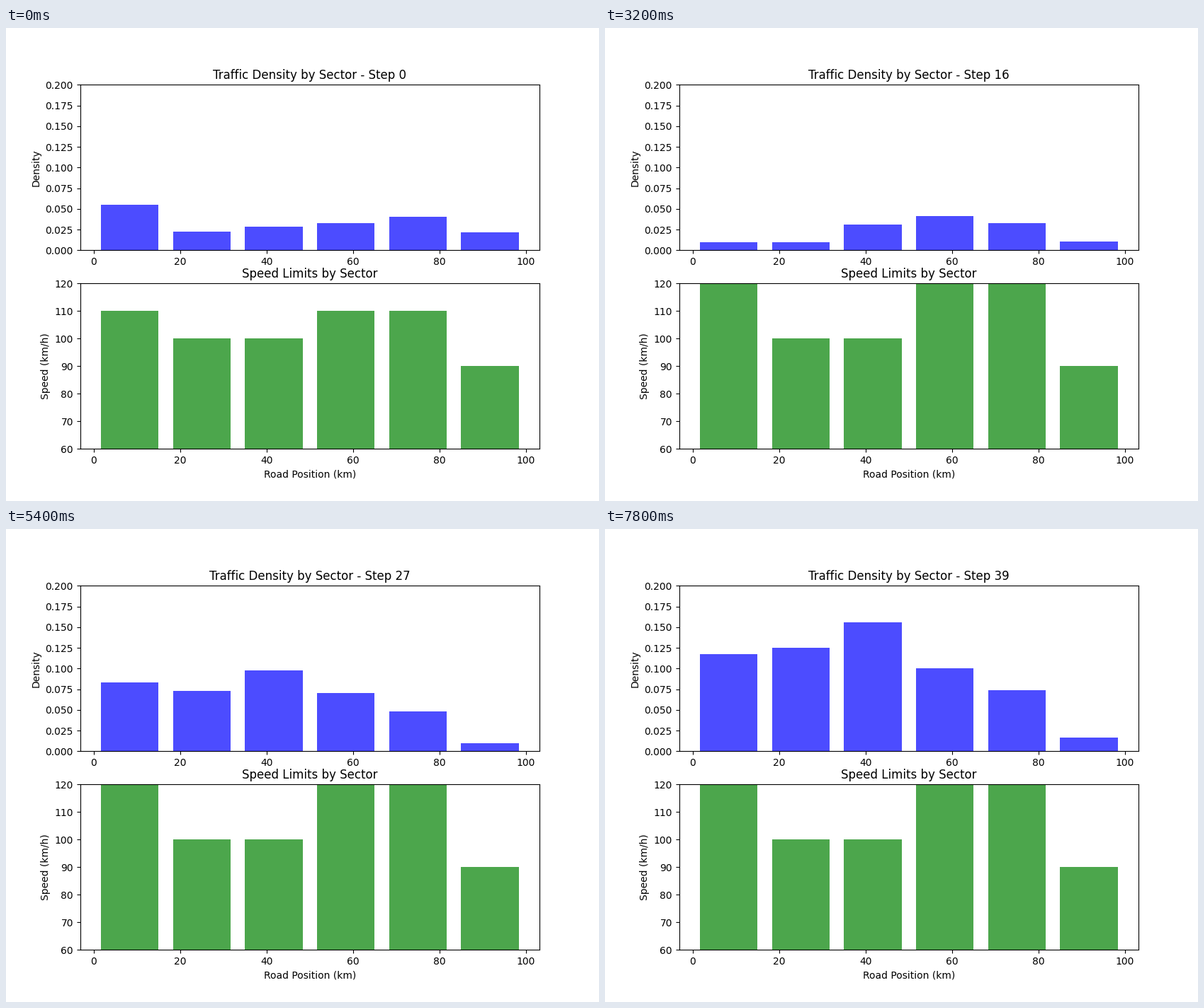
A matplotlib script that plays this animation: 837x669 px, repeating every 8000 ms.

```python
import numpy as np
import matplotlib.pyplot as plt
from matplotlib.animation import FuncAnimation

STEPS = 40
SECTORS = 6
ROAD = 100

# Sector densities at key steps; congestion waves roll down the road.
KEYS = {
    0: [.0550, .0222, .0287, .0330, .0402, .0215],
    6: [.0575, .0422, .0565, .0474, .0235, .0440],
    10: [.0592, .0557, .0750, .0572, .0265, .0592],
    16: [.0100, .0100, .0315, .0415, .0330, .0106],
    18: [.0400, .0310, .0400, .0405, .0305, .0100],
    22: [.1080, .0830, .0660, .0390, .0250, .0130],
    24: [.1150, .0950, .0850, .0550, .0340, .0115],
    27: [.0836, .0730, .0980, .0702, .0480, .0100],
    30: [.0900, .0820, .0970, .0740, .0520, .0200],
    34: [.1635, .1430, .1187, .0715, .0415, .0215],
    36: [.1600, .1460, .1350, .0830, .0520, .0100],
    39: [.1172, .1252, .1560, .1001, .0737, .0165],
}
START_LIMITS = [110, 100, 100, 110, 110, 90]
RAISED_LIMITS = [120, 100, 100, 120, 120, 90]

key_steps = list(KEYS)
key_values = np.array(list(KEYS.values()))

size = ROAD / SECTORS
centers = (np.arange(SECTORS) + 0.5) * size

# The small margin keeps the pixel size from being rounded down.
fig, (ax_density, ax_speed) = plt.subplots(
    2, 1, figsize=(8.37001, 6.69001), dpi=100)


def make_bars(ax, heights, color):
    return ax.bar(centers, heights, width=0.8 * size, color=color, alpha=0.7)


def set_heights(bars, heights):
    for bar, height in zip(bars, heights):
        bar.set_height(height)


density_bars = make_bars(ax_density, key_values[0], "blue")
ax_density.set_ylim(0, 0.2)
ax_density.set_ylabel("Density")
title = ax_density.set_title("Traffic Density by Sector - Step 0")

speed_bars = make_bars(ax_speed, START_LIMITS, "green")
ax_speed.set_ylim(60, 120)
ax_speed.set_title("Speed Limits by Sector")
ax_speed.set_xlabel("Road Position (km)")
ax_speed.set_ylabel("Speed (km/h)")


def update(step):
    density = [np.interp(step, key_steps, col) for col in key_values.T]
    set_heights(density_bars, density)
    set_heights(speed_bars, START_LIMITS if step == 0 else RAISED_LIMITS)
    title.set_text(f"Traffic Density by Sector - Step {step}")
    return [*density_bars, *speed_bars, title]


anim = FuncAnimation(fig, update, frames=STEPS, interval=200, repeat=True,
                     init_func=lambda: update(0), blit=False)
plt.show()
```
